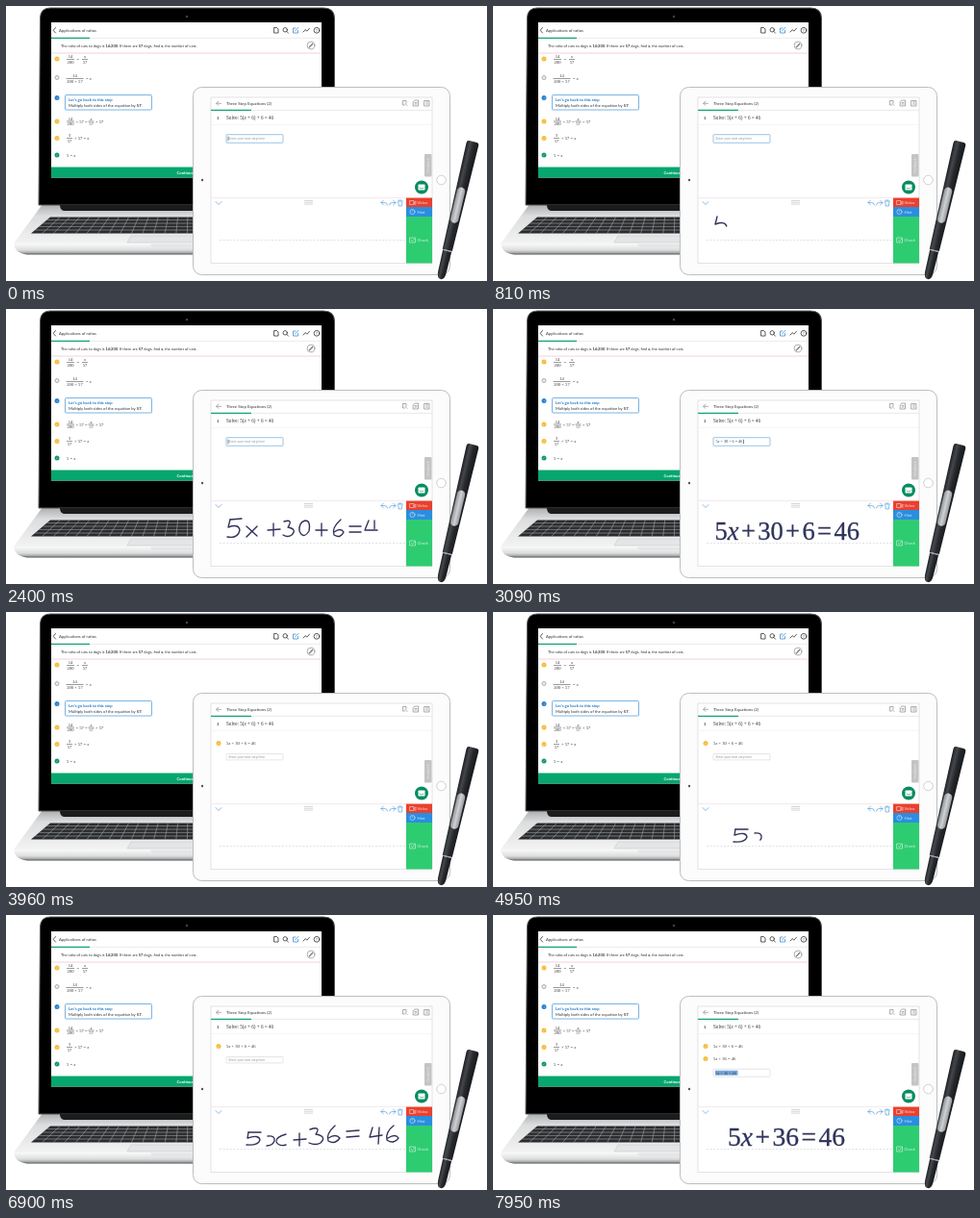
Animation of 500x286 px, one loop 8000 ms. Source, as an HTML page:

```html
<!DOCTYPE html>
<html lang="en">
<head>
<meta charset="utf-8">
<title>Step-by-step algebra</title>
<style>
  html, body { margin: 0; width: 100%; height: 100%; overflow: hidden; background: #fff; }
  svg { display: block; width: 100%; height: 100%; }
  text { font: 4.2px Lato, sans-serif; fill: #333; }
  .math { font: 4.6px "Liberation Serif", serif; }
  .mid { text-anchor: middle; }
  .bold { font-weight: 700; }
  .white { fill: #fff; }
  .line { fill: none; stroke: #777; stroke-width: .6; stroke-linecap: round; stroke-linejoin: round; }
  .dark { stroke: #333; stroke-width: .8; }
  .blue { stroke: #3d8fd6; }
  .paper { stroke: #fff; }
  #ink path { fill: none; stroke: #30305a; stroke-width: 1.35; stroke-linecap: round; stroke-linejoin: round; }
  #typeset { font: 27px "Liberation Serif", serif; fill: #30345c; stroke: #30345c; stroke-width: .3; }
</style>
</head>
<body>
<svg viewBox="0 0 500 286" preserveAspectRatio="none">
  <defs>
    <linearGradient id="deck" x2="0" y2="1">
      <stop stop-color="#a9abad"/><stop offset=".3" stop-color="#dcddde"/><stop offset="1" stop-color="#f3f3f3"/>
    </linearGradient>
    <linearGradient id="front" x2="0" y2="1">
      <stop stop-color="#fafafa"/><stop offset=".6" stop-color="#dcddde"/><stop offset=".85" stop-color="#a4a6a8"/><stop offset="1" stop-color="#4c4e50"/>
    </linearGradient>
    <linearGradient id="barrel">
      <stop stop-color="#1a1b1e"/><stop offset=".3" stop-color="#44474c"/><stop offset=".6" stop-color="#26282c"/><stop offset="1" stop-color="#17181a"/>
    </linearGradient>
    <linearGradient id="clip">
      <stop stop-color="#8d9095"/><stop offset=".5" stop-color="#cfd1d4"/><stop offset="1" stop-color="#94979b"/>
    </linearGradient>
  </defs>

  <!-- Laptop body -->
  <path d="M38 206H340V247H8Z" fill="url(#deck)"/>
  <path d="M8 247H340V258.500H22Q9 257 8 247Z" fill="url(#front)"/>
  <path d="M150 247.500H215V251H155Q151 251 150 247.500Z" fill="#e4e5e6"/>
  <path d="M46 219.500H200V236.500H26Z" fill="#2b2c2f"/>
  <g id="keys" stroke="#a2a4a7" stroke-width=".6"></g>
  <path d="M130 239H200V246H126Z" fill="#e4e5e6" stroke="#c2c4c6" stroke-width=".5"/>
  <path d="M46 2H330Q341.500 2 341.500 13V207H34L35.500 12Q36 2 46 2Z" fill="#000" stroke="#55585b"/>
  <path d="M56 207H200V213H60Q56 212 56 207Z" fill="#1b1c1e"/>
  <circle cx="188" cy="11" r="1.300" fill="#3c4046"/>

  <!-- Laptop screen -->
  <path d="M47 17H328V178.500H47Z" fill="#fff"/>
  <path d="M47 33.300H328" stroke="#ddd" stroke-width=".6"/>
  <path d="M47 33.300H87" stroke="#12a66c" stroke-width="1.2"/>
  <path class="line dark" d="M51.500 22.500L49.200 25.300L51.500 28"/>
  <text x="55" y="26.800">Applications of ratios</text>
  <g class="line dark">
    <path d="M279 22.500H281.500L283 24V28H279Z"/>
    <circle cx="290.200" cy="24.800" r="2.200"/><path d="M291.800 26.400L293.500 28.200"/>
    <path class="blue" d="M301 23H298.500V28H303.500V25.500M300.500 26L304 22.300"/>
    <path d="M309 27L311.300 24.500L312.800 26.200L315.500 23.200"/>
    <circle cx="323" cy="25.300" r="2.900"/>
  </g>
  <g class="line"><circle cx="317" cy="41" r="3.900"/><path d="M315.300 42.900L318.800 39.300" stroke-width="1.300"/></g>
  <text class="mid" x="323" y="26.800">?</text>
  <text x="57" y="42.500" style="font-size:3.95px">The ratio of cats to dogs is <tspan class="bold">14:200</tspan>. If there are <tspan class="bold">57</tspan> dogs, find <tspan class="bold">x</tspan>, the number of cats.</text>
  <path d="M47 49H328" stroke="#f6c4d6" stroke-width=".8"/>
  <g id="solution"></g>
  <rect x="61.500" y="92.500" width="90" height="15.500" rx="1" fill="#fff" stroke="#58a3dd" stroke-width=".8"/>
  <text class="bold" x="65" y="99" style="fill:#2277bd">Let's go back to this step</text>
  <text x="65" y="104.500">Multiply both sides of the equation by <tspan class="bold">57</tspan>.</text>
  <path d="M47 167.500H328V178.500H47Z" fill="#07a66e"/>
  <text class="white bold" x="177.500" y="174.600">Continue</text>

  <!-- Tablet -->
  <rect x="194.500" y="84.500" width="267" height="195" rx="9" fill="#fcfcfc" stroke="#bcbdbf"/>
  <path d="M213 95H443V267.500H213Z" fill="#fff" stroke="#d2d2d2" stroke-width=".6"/>
  <circle cx="204" cy="181" r="1.200" fill="#55585c"/>
  <circle cx="452.500" cy="181" r="4.800" fill="#fff" stroke="#c4c4c6" stroke-width=".8"/>
  <path d="M213 108.300H443" stroke="#d7d7d7" stroke-width=".6"/>
  <path d="M213 108.300H255" stroke="#12a66c" stroke-width="1.200"/>
  <path class="line" d="M223.500 101.300H218.800M220.800 99.200L218.800 101.300L220.800 103.400"/>
  <text x="229" y="102.900" style="font-size:4.4px">Three Step Equations (2)</text>
  <g class="line">
    <path d="M416 101V98.500H412.500V103H414.500M415 101.500L417 103.500"/>
    <path d="M423.500 99.500L425 98H428.500V104H423.500ZM425 100.500H427M425 102H427"/>
    <path d="M435 98.500H440V104H435ZM436.500 100H438.500M436.500 102H438.500"/>
  </g>
  <text class="math bold" x="219" y="118">1</text>
  <text class="math" x="229" y="118.300" style="font-size:5.1px">Solve: 5(<tspan font-style="italic">x</tspan> + 6) + 6 = 46</text>
  <path d="M213 123.500H443" stroke="#ececec" stroke-width=".5"/>

  <g id="steps"></g>
  <g id="field">
    <rect id="box" x="229" width="59" rx=".8" fill="#fff" stroke-width=".7"/>
    <rect id="selection" x="231" width="23.500" height="5" fill="#76a9dc"/>
    <text id="entry" x="231.500"></text>
    <path id="caret" stroke="#333" stroke-width=".6"/>
  </g>

  <rect x="435" y="154" width="7.500" height="23.500" rx="1" fill="#c3c4c5"/>
  <text class="mid" transform="translate(440 166) rotate(-90)" style="font-size:3.6px;fill:#e6e6e6">Feedback</text>
  <circle cx="432" cy="188.500" r="7" fill="#078c61"/>
  <rect x="428.500" y="185.500" width="7" height="6" rx=".8" fill="#fff"/>
  <path d="M430 189.300Q432 191 434 189.300" class="line" style="stroke:#078c61"/>

  <!-- Writing pad -->
  <path d="M213 199.500H416" stroke="#f3e4ea" stroke-width=".8"/>
  <path d="M222 243.500H416" stroke="#d3d5d8" stroke-width=".7" stroke-dasharray="2 1.600"/>
  <path class="line blue" d="M218 203.500L221 206.500L224 203.500"/>
  <path d="M310 202.500H319M310 204.300H319M310 206.100H319" stroke="#c6c6c6" stroke-width=".7"/>
  <g class="line blue">
    <path d="M392.500 202L390 204.500L392.500 207M390 204.500H393.500Q396.500 204.500 396.500 207"/>
    <path d="M402.500 202L405 204.500L402.500 207M405 204.500H401.500Q398.500 204.500 398.500 207"/>
    <path d="M407 203H412.500M408.500 202H411M407.800 204L408.200 208H411.400L411.800 204"/>
  </g>
  <path d="M416 199.500H443V209H416Z" fill="#e8412f"/>
  <path d="M416 209H443V219H416Z" fill="#2b8de0"/>
  <path d="M416 219H443V267.500H416Z" fill="#2ecc71"/>
  <g opacity=".8">
    <g class="line paper">
      <path d="M420 202.500H424V206.500H420ZM424 204.500L426 203V206Z"/>
      <circle cx="422.500" cy="214" r="2.600"/>
      <path d="M420 241H425.500V246H420ZM421.500 243.500L422.500 244.700L424.500 242.300"/>
    </g>
    <text class="white" x="427.500" y="206">Video</text>
    <text class="white" x="427.500" y="215.500">Hint</text>
    <text class="white" x="427.500" y="245">Check</text>
    <text class="white mid" x="422.500" y="215.400">?</text>
  </g>
  <g id="ink"></g>
  <text id="typeset" y="240"></text>

  <!-- Stylus -->
  <g transform="translate(485.500 141) rotate(13.300)">
    <path d="M-6.500 3Q-6.500 0 -4 0H4Q6.500 0 6.500 3L5.200 116H-5.200Z" fill="url(#barrel)"/>
    <path d="M-4.600 117H4.600L4.300 140Q4 147 0 147Q-4 147 -4.300 140Z" fill="url(#barrel)"/>
    <path d="M-5 116.500H5" stroke="#8b8f94" stroke-width=".8"/>
    <rect x="-4.500" y="49" width="8.500" height="38" rx="4.200" fill="url(#clip)"/>
  </g>
</svg>

<script>
const LOOP = 8000;
const TYPESET_1 = 2760, SUBMIT_1 = 3700, TYPESET_2 = 7080, SUBMIT_2 = 7300;
const FIRST = '5x+30+6=46', SECOND = '5x+36=46';
const get = id => document.getElementById(id);
const italicX = s => s.replace(/x/g, '<tspan font-style="italic">x</tspan>');
const spaced = s => italicX(s.replace(/[+=]/g, ' $& '));
const thinSpaced = s => s.replace(/([+=])(\d)/g, '<tspan dx=".09em">$1</tspan><tspan dx=".09em">$2</tspan>')
  .replace('5x', '5<tspan font-style="italic">x</tspan>');
const math = (x, y, s) => `<text class="math" x="${x}" y="${y + 1.5}">${italicX(s)}</text>`;
const bullet = (x, y, color, mark = '✓') => `<circle cx="${x}" cy="${y}" r="2.500" fill="${color}"/>` +
  `<text class="white mid" x="${x}" y="${y + 1.1}" style="font:3px 'DejaVu Sans',sans-serif">${mark}</text>`;
const fraction = (x, y, top, bottom, half = 4) =>
  `<path d="M${x - half} ${y}h${half * 2}" stroke="#333" stroke-width=".5"/>` +
  `<text class="math mid" x="${x}" y="${y - 1.3}">${italicX(top)}</text>` +
  `<text class="math mid" x="${x}" y="${y + 4.3}">${bottom}</text>`;

// Keyboard gaps follow the perspective of the deck.
let keys = '';
for (const y of [222.6, 226, 229.4, 233]) keys += `<path d="M${46 - (y - 219.5) * 1.18} ${y}H200"/>`;
for (let i = 1; i < 15; i++) keys += `<path d="M${46 + i * 10.2} 219.500L${26 + i * 11.6} 236.500"/>`;
get('keys').innerHTML = keys;

const ORANGE = '#f7bd3e';
get('solution').innerHTML =
  bullet(53, 55, ORANGE) + fraction(67, 55.5, '14', '200') + math(73.5, 55.5, '=') + fraction(82, 55.5, 'x', '57', 3) +
  '<circle cx="53" cy="74.500" r="2" fill="#eee" stroke="#999" stroke-width=".8"/>' +
  fraction(71.5, 75.5, '14', '200 × 57', 9) + math(83, 75.5, '= x') +
  bullet(53, 95.5, '#2a83d0', '!') +
  bullet(53, 120, ORANGE) + fraction(67, 120, '14', '200') + math(72.5, 120, '× 57 =') +
  fraction(88.5, 120, 'x', '57', 3) + math(93, 120, '× 57') +
  bullet(53, 137.5, ORANGE) + fraction(66, 137.5, '3', '57', 3) + math(71, 137.5, '× 57 = x') +
  bullet(53, 155, '#149a66') + math(63, 155, '5 = x');

const solvedStep = (y, s) =>
  `<g>${bullet(221, y, ORANGE)}<text class="math" x="229" y="${y + 1.3}">${spaced(s)}</text></g>`;
get('steps').innerHTML = solvedStep(136.5, FIRST) + solvedStep(149.5, SECOND);
const [stepOne, stepTwo] = get('steps').children;

// Each phrase is written stroke by stroke and later wiped.
const phrases = [
  { from: 650, to: 1450, wipe: TYPESET_1, strokes: [
    'M233 219L231 227Q242 223 243 230Q241 239 230 237', 'M233 219L245 218',
    'M250 226L261 236', 'M261 226L250 237', 'M272 230L285 229', 'M278 223V236'] },
  { from: 1460, to: 2650, wipe: TYPESET_1, strokes: [
    'M289 221Q299 218 293 227Q303 229 297 235Q293 238 288 235',
    'M311 220Q304 222 305 231Q309 240 315 231Q317 220 311 220',
    'M322 230H334', 'M328 223V236', 'M348 219Q338 228 341 235Q348 239 351 232Q348 227 341 232',
    'M357 226H369', 'M357 232H369', 'M377 220L373 230H386', 'M383 220V238',
    'M401 218Q391 227 394 235Q401 239 404 232Q401 227 394 232'] },
  { from: 4560, to: 5000, wipe: TYPESET_2, strokes: [
    'M252 226L251 232Q263 228 264 234Q262 240 250 239', 'M252 226L265 226', 'M272 230Q280 229 279 235Q277 240 271 240'] },
  { from: 5010, to: 5860, wipe: TYPESET_2, strokes: [
    'M291 228Q280 231 281 236Q284 241 291 239', 'M299 234L312 233', 'M305 227V240',
    'M316 223Q328 219 322 228Q334 230 327 237Q322 240 315 237',
    'M342 219Q332 228 335 235Q342 239 347 232Q343 227 335 232',
    'M354 225L367 224', 'M354 231L367 230'] },
  { from: 5880, to: 6190, wipe: 6420, strokes: [
    'M377 220L372 230L384 229', 'M382 222L380 237', 'M379 220L393 218',
    'M386 224Q395 219 394 225Q391 232 385 234L398 233'] },
  { from: 6480, to: 6860, wipe: TYPESET_2, strokes: [
    'M381 221L378 231L391 229', 'M388 221L387 238', 'M403 219Q394 226 396 234Q403 239 408 232Q405 227 397 232'] }
];
for (const phrase of phrases) {
  phrase.paths = phrase.strokes.map(d => {
    const path = document.createElementNS('http://www.w3.org/2000/svg', 'path');
    path.setAttribute('d', d);
    return get('ink').appendChild(path);
  });
  phrase.lengths = phrase.paths.map(p => p.getTotalLength());
  phrase.total = phrase.lengths.reduce((a, b) => a + b);
}

const show = (el, on) => { el.style.display = on ? '' : 'none'; };
const setText = (el, html) => { if (el.source !== html) el.innerHTML = el.source = html; };

function drawInk(t) {
  for (const { from, to, wipe, paths, lengths, total } of phrases) {
    let drawn = Math.min(1, (t - from) / (to - from)) * total;
    paths.forEach((path, i) => {
      show(path, t < wipe && drawn > 0);
      path.setAttribute('stroke-dasharray', drawn >= lengths[i] ? 'none' : `${Math.max(0, drawn)} 999`);
      drawn -= lengths[i];
    });
  }
}

function drawField(t) {
  const row = t < SUBMIT_1 ? 0 : t < SUBMIT_2 ? 1 : 2;
  const centre = [138, 150.7, 164.2][row];
  const height = [8.6, 6.4, 8][row];
  const value = row === 0 ? (t >= TYPESET_1 ? FIRST : '') : t >= TYPESET_2 ? SECOND : '';
  const box = get('box'), entry = get('entry');
  box.setAttribute('y', centre - height / 2);
  box.setAttribute('height', height);
  box.setAttribute('stroke', row ? '#dcdcdc' : '#6fadde');
  setText(entry, value ? spaced(value) : 'Enter your next step here');
  entry.setAttribute('class', value ? 'math' : '');
  entry.setAttribute('y', centre + 1.4);
  entry.style.fontSize = value ? '4.2px' : '3.4px';
  entry.style.fill = value ? '#333' : '#999';
  get('selection').setAttribute('y', centre - 2.5);
  show(get('selection'), row === 2);
  get('caret').setAttribute('d', `M${value ? 260.5 : 231} ${centre - 2.3}v4.6`);
  show(get('caret'), row === 0 && (value || t % 1060 < 420));
}

function drawTypeset(t) {
  const first = t < SUBMIT_1;
  const el = get('typeset');
  show(el, first ? t >= TYPESET_1 : t >= TYPESET_2);
  setText(el, thinSpaced(first ? FIRST : SECOND));
  el.setAttribute('x', first ? 230.5 : 244);
  el.style.fontSize = first ? '26.5px' : '27.5px';
}

function render(now) {
  const t = now % LOOP;
  drawInk(t);
  drawField(t);
  drawTypeset(t);
  show(stepOne, t >= SUBMIT_1);
  show(stepTwo, t >= SUBMIT_2);
}

const start = performance.now();
function tick() {
  render(performance.now() - start);
  requestAnimationFrame(tick);
}
tick();
</script>
</body>
</html>
```
